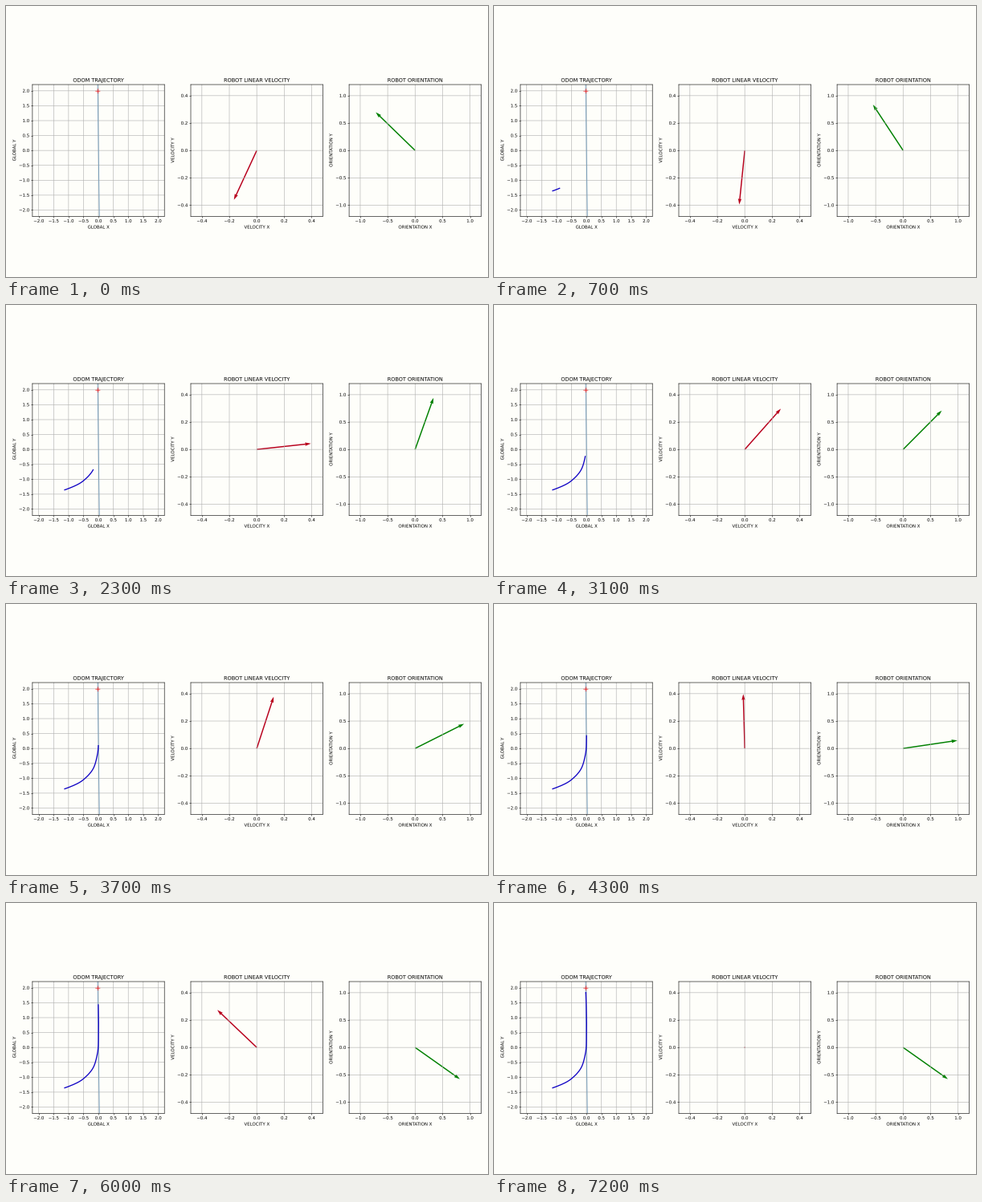
These frames come from a looping animation (600x338 px, 7300 ms). A matplotlib script:

```python
import matplotlib.pyplot as plt
import numpy as np
from matplotlib.animation import FuncAnimation
from matplotlib.patheffects import Normal

DPI = 39.0625
WIDTH, HEIGHT = 600, 338
FRAMES, INTERVAL = 73, 100
SIDE, LEFT, TOP, STEP = 164.3, 32.9, 98.0, 197.1  # panel layout in pixels
PAPER = "#fefefa"
SPEED = 0.397
TURN_END, STOP = 57.4, 67
GOAL, ARM = (-0.02, 1.99), 0.07

plt.rcParams.update({
    "font.family": "DejaVu Sans",
    "text.hinting": "none",
    "path.snap": False,
    "axes.linewidth": 1.1,
    "axes.labelpad": 5.2,
    "xtick.major.width": 1.0,
    "ytick.major.width": 1.0,
    "grid.linewidth": 1.1,
    "grid.color": "#b0b0b0",
})

# Key poses: time in frames, then value.
TURN_T = [0, 3, 14, 23, 31, 43, 52, TURN_END]
HEADING = [135.8, 133, 98.7, 70.4, 45.2, 8.4, -19.1, -35.3]
COURSE = [-114.8, -112, -50.2, 6.2, 48.5, 91.6, 120.2, 136.4]
PATH_T = [0, 3, 14, 23, 31, 43, 52, 64, 68, 72]
PATH_X = [-1.13, -1.065, -0.527, -0.178, -0.04, 0.003, 0.003, -0.012, -0.018, -0.018]
PATH_Y = [-1.357, -1.335, -1.07, -0.684, -0.234, 0.425, 0.937, 1.65, 1.83, 1.84]


def spline(t, times, values):
    """Cubic Hermite curve through the key values."""
    times, values = np.asarray(times, float), np.asarray(values, float)
    slopes = np.gradient(values, times)
    t = np.clip(t, times[0], times[-1])
    i = np.clip(np.searchsorted(times, t, side="right") - 1, 0, len(times) - 2)
    h = times[i + 1] - times[i]
    u = (t - times[i]) / h
    return ((1 + 2 * u) * (1 - u) ** 2 * values[i]
            + u * (1 - u) ** 2 * h * slopes[i]
            + u ** 2 * (3 - 2 * u) * values[i + 1]
            + u ** 2 * (u - 1) * h * slopes[i + 1])


def panel(col, title, name, limit, ticks):
    bottom = HEIGHT - TOP - SIDE
    ax = fig.add_axes([(LEFT + col * STEP) / WIDTH, bottom / HEIGHT,
                       SIDE / WIDTH, SIDE / HEIGHT], facecolor=PAPER)
    ax.set(title=title, xlabel=name + " X", ylabel=name + " Y",
           xticks=ticks, yticks=ticks,
           xlim=(-limit, limit), ylim=(-limit, limit))
    ax.set_autoscale_on(False)
    ax.grid(True)
    # Drawing text as paths keeps it at subpixel positions.
    for text in [ax.title, ax.xaxis.label, ax.yaxis.label,
                 *ax.get_xticklabels(), *ax.get_yticklabels()]:
        text.set_path_effects([Normal()])
    return ax


def arrow(ax, color):
    return ax.quiver([0], [0], [1], [0], color=color, angles="xy",
                     scale_units="xy", scale=1, width=0.009)


def point(quiver, degrees, length):
    a = np.radians(degrees)
    quiver.set_UVC([length * np.cos(a)], [length * np.sin(a)])


# The tiny margin guards the pixel height against rounding down.
fig = plt.figure(figsize=(15.36, 8.6528 + 1e-9), dpi=DPI, facecolor=PAPER)

odom = panel(0, "ODOM TRAJECTORY", "GLOBAL", 2.21, np.arange(-4, 5) / 2)
linear = panel(1, "ROBOT LINEAR VELOCITY", "VELOCITY", 0.481, np.arange(-2, 3) / 5)
facing = panel(2, "ROBOT ORIENTATION", "ORIENTATION", 1.203, np.arange(-2, 3) / 2)

odom.plot([-0.026, 0.032], [2.3, -2.3], color="#7099b8", lw=1.7)
trail, = odom.plot([], [], color="#0d00c4", lw=2.4)
gx, gy = GOAL
odom.plot([gx - ARM, gx + ARM], [gy, gy], color="red", lw=1.2)
odom.plot([gx, gx], [gy - ARM, gy + ARM], color="red", lw=1.2)
velocity = arrow(linear, "#b8001c")
heading = arrow(facing, "#008000")


def update(frame):
    t = np.linspace(0, frame, 4 * frame + 1)
    if frame:
        trail.set_data(spline(t, PATH_T, PATH_X), spline(t, PATH_T, PATH_Y))
    else:
        trail.set_data([], [])
    point(velocity, spline(frame, TURN_T, COURSE), SPEED if frame < STOP else 0)
    point(heading, spline(frame, TURN_T, HEADING), 1)
    return trail, velocity, heading


anim = FuncAnimation(fig, update, frames=FRAMES, interval=INTERVAL,
                     repeat=True, repeat_delay=0, blit=False)
plt.show()
```
